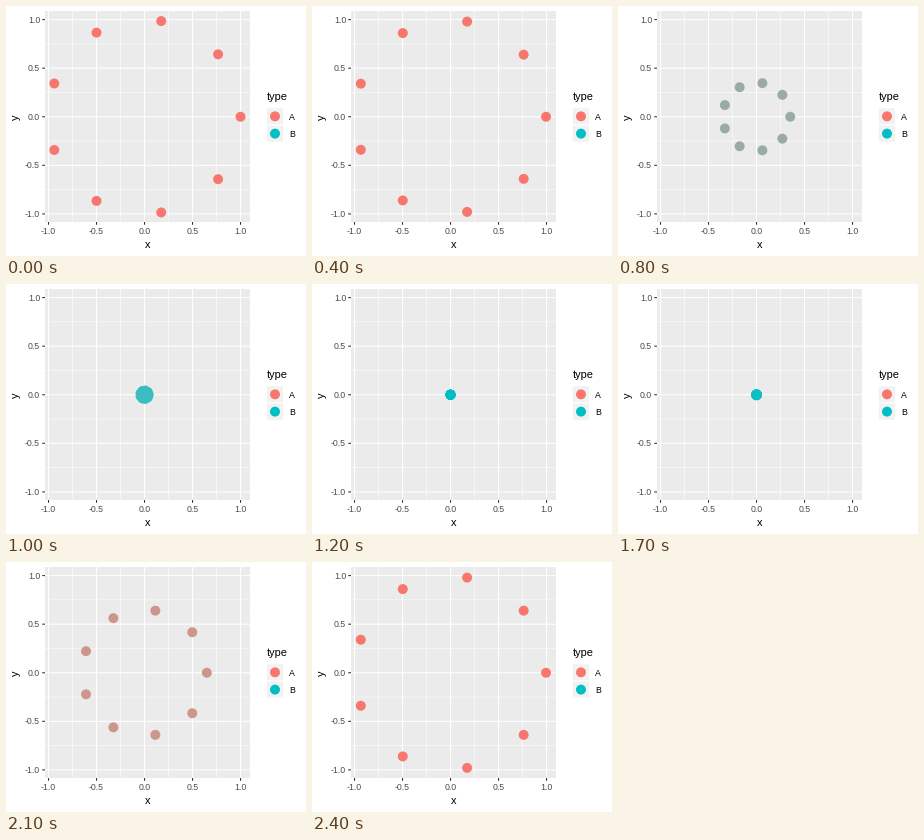
Animation, 300 px wide and 250 px high, one loop 2500 ms. Source, as a matplotlib script:

```python
import numpy as np
import matplotlib.pyplot as plt
from matplotlib.animation import FuncAnimation
from matplotlib.colors import to_rgb
from matplotlib.patches import Circle, Rectangle

plt.rcParams["font.family"] = "Liberation Sans"
plt.rcParams["axes.unicode_minus"] = False

W, H, DPI = 300, 250, 72
LEFT, RIGHT, TOP, BOTTOM = 39, 243.85, 5.5, 216
CORAL, TEAL = "#F8766D", "#00BFC4"
RADIUS = 4.97
STEPS = 9           # frames per transition
HOLD_A, HOLD_B = 3, 16  # last still frame of each state

angles = np.arange(9) * 2 * np.pi / 9
ring = np.column_stack([np.cos(angles), np.sin(angles)])


def make_scale(values, start, end):
    lo, hi = values.min(), values.max()
    pad = 0.05 * (hi - lo)
    lo, hi = lo - pad, hi + pad
    return lambda v: start + (v - lo) / (hi - lo) * (end - start)


px = make_scale(ring[:, 0], LEFT, RIGHT)
py = make_scale(ring[:, 1], BOTTOM, TOP)

# Colours blend in CIE Lab
RGB_XYZ = np.array([[0.4124564, 0.3575761, 0.1804375],
                    [0.2126729, 0.7151522, 0.0721750],
                    [0.0193339, 0.1191920, 0.9503041]])
WHITE = RGB_XYZ.sum(axis=1)


def to_lab(color):
    c = np.array(to_rgb(color))
    lin = np.where(c > 0.04045, ((c + 0.055) / 1.055) ** 2.4, c / 12.92)
    q = RGB_XYZ @ lin / WHITE
    f = np.where(q > 0.008856, np.cbrt(q), 7.787 * q + 16 / 116)
    return np.array([116 * f[1] - 16, 500 * (f[0] - f[1]), 200 * (f[1] - f[2])])


def from_lab(lab):
    fy = (lab[0] + 16) / 116
    f = np.array([fy + lab[1] / 500, fy, fy - lab[2] / 200])
    q = np.where(f > 0.206893, f ** 3, (f - 16 / 116) / 7.787)
    lin = np.clip(np.linalg.solve(RGB_XYZ, q * WHITE), 0, 1)
    c = np.where(lin > 0.0031308, 1.055 * lin ** (1 / 2.4) - 0.055, 12.92 * lin)
    return np.clip(c, 0, 1)


LAB_A, LAB_B = to_lab(CORAL), to_lab(TEAL)


def cubic_in_out(t):
    return 4 * t ** 3 if t < 0.5 else 1 - 4 * (1 - t) ** 3


def progress(i):
    """0 on the ring, 1 at the centre."""
    if i <= HOLD_B:
        return cubic_in_out(min(max(i - HOLD_A, 0) / STEPS, 1))
    return 1 - cubic_in_out((i - HOLD_B) / STEPS)


fig = plt.figure(figsize=(W / DPI, H / DPI), dpi=DPI, facecolor="white")
ax = fig.add_axes([0, 0, 1, 1])
ax.set_xlim(0, W)
ax.set_ylim(H, 0)
ax.axis("off")


def line(xs, ys, color, width, z=1):
    ax.plot(xs, ys, color=color, lw=width, zorder=z, snap=False,
            solid_capstyle="butt")


def label(x, y, text, size=8.8, color="black", ha="left", **kw):
    ax.text(x, y, text, fontsize=size, color=color, ha=ha,
            va="baseline", **kw)


def dot(x, y, color):
    return ax.add_patch(Circle((x, y), RADIUS, fc=color, lw=0, zorder=5))


# Panel and grid
ax.add_patch(Rectangle((LEFT, 5), 205, 211, fc="#EBEBEB", lw=0, zorder=0,
                       snap=True))
for v in (-0.75, -0.25, 0.25, 0.75):
    line([px(v)] * 2, [5, 216], "white", 0.53)
    line([LEFT, 244], [py(v)] * 2, "white", 0.53)
for v in (-1, -0.5, 0, 0.5, 1):
    x, y = px(v), py(v)
    line([x, x], [5, 216], "white", 1.07, 2)
    line([LEFT, 244], [y, y], "white", 1.07, 2)
    line([x, x], [BOTTOM, BOTTOM + 2.75], "#333333", 1.07, 3)
    line([LEFT - 2.75, LEFT], [y, y], "#333333", 1.07, 3)
    label(x, 227.6, f"{v:.1f}", color="#4D4D4D", ha="center")
    label(34.05, y + 3.15, f"{v:.1f}", color="#4D4D4D", ha="right")

label((LEFT + RIGHT) / 2, 242, "x", 11, ha="center")
ax.text(13, (TOP + BOTTOM) / 2, "y", fontsize=11, rotation=90,
        ha="right", va="center", rotation_mode="default").set_position(
            (15.3, (TOP + BOTTOM) / 2))

# Legend
KEY = 17.28
label(260.35, 94.5, "type", 11)
for n, (name, color) in enumerate([("A", CORAL), ("B", TEAL)]):
    top = 101.7 + n * KEY
    ax.add_patch(Rectangle((260.35, top), KEY, KEY, fc="#F2F2F2", ec="white",
                           lw=1.07, zorder=1, snap=False))
    dot(260.35 + KEY / 2, top + KEY / 2, color)
    label(283.1, top + KEY / 2 + 3.2, name)

dots = [dot(px(x), py(y), CORAL) for x, y in ring]


def update(i):
    p = progress(i)
    color = from_lab(LAB_A + (LAB_B - LAB_A) * p)
    for d, (x, y) in zip(dots, ring * (1 - p)):
        d.center = px(x), py(y)
        d.set_facecolor(color)
    return dots


anim = FuncAnimation(fig, update, frames=25, interval=100, repeat=True,
                     repeat_delay=0, blit=False)
plt.show()
```
